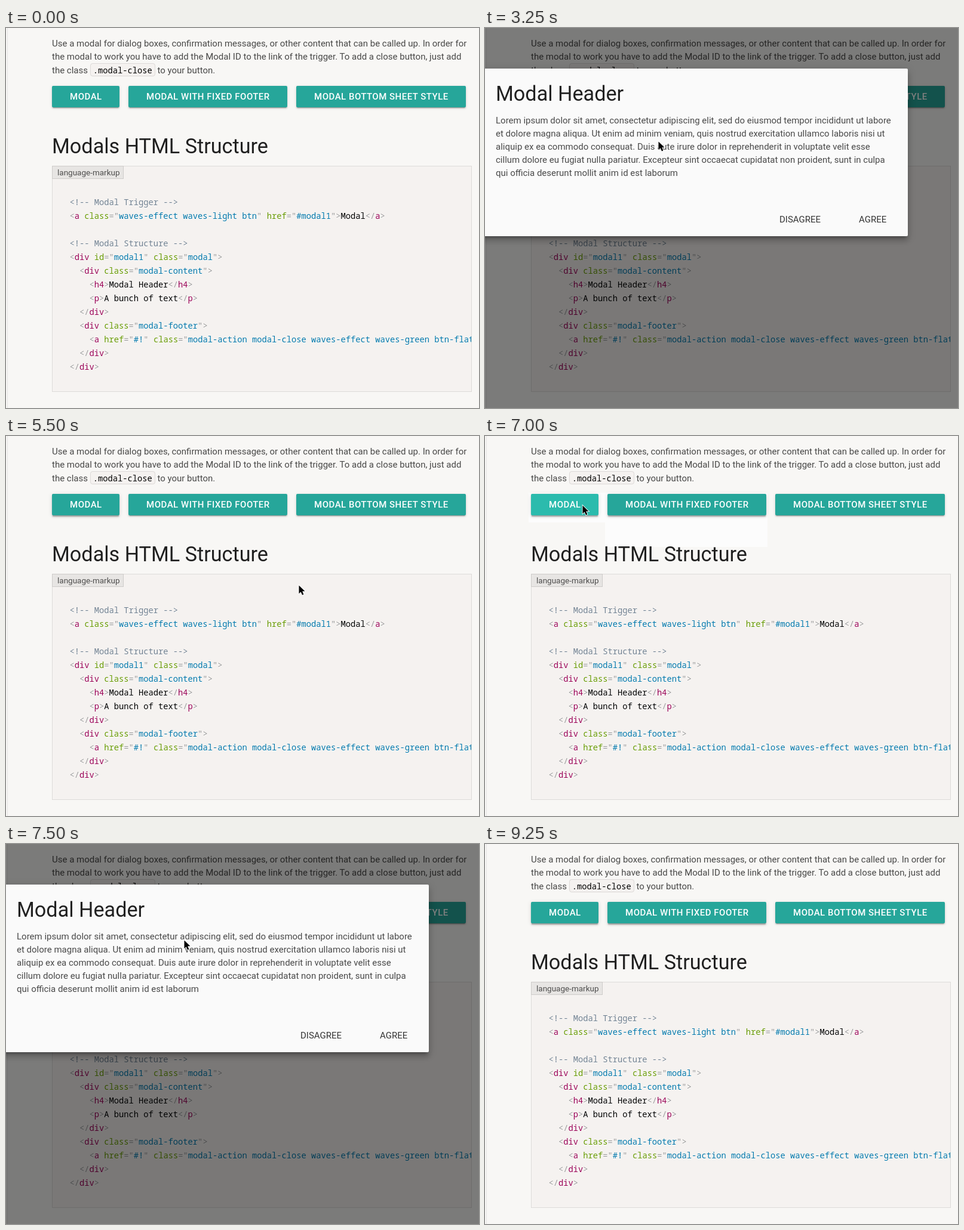
An HTML page for the animation above (10 s loop, 792 by 637 pixels).

```html
<!DOCTYPE html>
<html lang="en">
<head>
<meta charset="utf-8">
<title>Modals</title>
<style>
  html, body { margin: 0; width: 100%; height: 100%; overflow: hidden; }
  body {
    position: relative;
    background: #f8f7f5;
    font: 15px/22.5px Roboto, sans-serif;
    color: rgba(0, 0, 0, .71);
  }
  .edge, .glow, .intro, .btn, h4, pre, .label, .veil, .modal, .modal p, .flat, .wave, .cursor {
    position: absolute;
    margin: 0;
    box-sizing: border-box;
  }
  .intro, h4, .btn, .modal p, .flat, .label { white-space: pre; }

  .edge { left: 2px; top: 0; width: 1px; height: 100%; background: #e6e5e4; }
  .glow { background: #fcfcfc; opacity: 0; }
  .glow.a { left: 201px; top: 95px; width: 272px; height: 91px; }
  .glow.b { left: 73px; top: 95px; width: 128px; height: 50px; }

  .intro { left: 77px; top: 14.7px; }
  code, pre { font: 13.75px/23px "Noto Sans Mono", monospace; color: #000; }
  .intro code {
    line-height: 20px;
    padding: .5px 4px;
    border: 1px solid rgba(0, 0, 0, .1);
    border-radius: 4px;
    background: #f5f2f0;
  }

  .btn {
    top: 97px;
    height: 36px;
    line-height: 36px;
    padding-left: 30px;
    overflow: hidden;
    border-radius: 2px;
    background: #26a69a;
    color: #fff;
    font-weight: 500;
    letter-spacing: .5px;
    box-shadow: 0 2px 2px rgba(0,0,0,.14), 0 1px 5px rgba(0,0,0,.12), 0 3px 1px -2px rgba(0,0,0,.2);
  }
  .btn.one { left: 77px; width: 113px; }
  .btn.two { left: 205px; width: 266px; }
  .btn.three { left: 486px; width: 284px; }

  h4 { font-size: 34.2px; line-height: 40px; font-weight: 400; color: rgba(0, 0, 0, .87); }
  .title { left: 77px; top: 178.3px; }

  pre {
    left: 77px; top: 231px; width: 703px; height: 379px;
    padding: 48.2px 0 0 28.5px;
    overflow: hidden;
    border: 1px solid rgba(51, 51, 51, .12);
    background: #f5f2f0;
    text-shadow: 0 1px #fff;
  }
  .note { color: #708090; }
  .mark { color: #999; }
  .tag { color: #905; }
  .attr { color: #690; }
  .val { color: #07a; }
  .label {
    left: 77px; top: 231px; width: 120px; height: 22px;
    padding-left: 8px;
    border: 1px solid rgba(51, 51, 51, .14);
    background: #e7e5e3;
    font-size: 13.5px;
    line-height: 21px;
    color: rgba(0, 0, 0, .66);
  }

  .veil { inset: 0; background: #000; opacity: 0; }
  .modal {
    left: -6px; top: 68px; width: 714px; height: 281px;
    border-radius: 2px;
    background: #fafafa;
    opacity: 0;
    box-shadow: 0 8px 10px 1px rgba(0,0,0,.14), 0 3px 14px 2px rgba(0,0,0,.12), 0 5px 5px -3px rgba(0,0,0,.3);
  }
  .modal h4 { left: 24px; top: 22.3px; }
  .modal p { left: 24px; top: 76px; line-height: 22px; }
  .flat {
    top: 235px; height: 36px;
    line-height: 36px;
    padding-left: 30px;
    overflow: hidden;
    border-radius: 2px;
    color: #343434;
  }
  .no { left: 469px; width: 129px; }
  .yes { left: 602px; width: 106px; }

  .wave { left: 0; top: 0; width: 0; height: 0; border-radius: 50%; opacity: 0; }
  .wave::after {
    content: "";
    position: absolute;
    left: -54px; top: -54px; width: 108px; height: 108px;
    border-radius: 50%;
    background: inherit;
  }
  .light { background: #fff; }
  .green { background: #4caf50; }
  .cursor { left: 0; top: 0; width: 16px; height: 20px; overflow: visible; opacity: 0; }

  /* The picture moves four times a second: 2.5% is one step. */
  .glow, .btn, .veil, .modal, .yes, .wave, .cursor { animation: none 10s step-end infinite; }
  .glow.a { animation-name: glowA; }
  .glow.b { animation-name: glowB; }
  .btn.one { animation-name: hoverOne; }
  .btn.two { animation-name: hoverTwo; }
  .yes { animation-name: hoverYes; }
  .light { animation-name: light; }
  .green { animation-name: green; }
  .veil { animation-name: veil; }
  .modal { animation-name: modal; }
  .cursor { animation-name: cursor; }

  @keyframes glowA { 60% { opacity: 1; } 72.5%, 100% { opacity: 0; } }
  @keyframes glowB { 67.5% { opacity: 1; } 72.5%, 100% { opacity: 0; } }
  @keyframes hoverOne {
    25%, 67.5% {
      background: #2bbbad;
      box-shadow: 0 3px 3px rgba(0,0,0,.14), 0 1px 7px rgba(0,0,0,.12), 0 3px 1px -1px rgba(0,0,0,.2);
    }
    0%, 30%, 75%, 100% { background: #26a69a; }
  }
  @keyframes hoverTwo {
    60% {
      background: #2bbbad;
      box-shadow: 0 3px 3px rgba(0,0,0,.14), 0 1px 7px rgba(0,0,0,.12), 0 3px 1px -1px rgba(0,0,0,.2);
    }
    0%, 67.5%, 100% { background: #26a69a; }
  }
  @keyframes hoverYes {
    45%, 85% { background: #ebebeb; }
    0%, 50%, 90%, 100% { background: transparent; }
  }
  @keyframes light {
    27.5% { opacity: .24; transform: translate(51px, 20px) scale(.95); }
    72.5% { opacity: .24; transform: translate(84px, 20px) scale(1); }
    0%, 30%, 75%, 100% { opacity: 0; }
  }
  @keyframes green {
    47.5% { opacity: .2; transform: translate(71px, 24px) scale(.48); }
    87.5% { opacity: .32; transform: translate(48px, 11px); }
    0%, 50%, 90%, 100% { opacity: 0; }
  }
  @keyframes veil {
    27.5% { opacity: .018; }
    30%, 75% { opacity: .5; }
    72.5% { opacity: .25; }
    87.5% { opacity: .21; }
    0%, 50%, 90%, 100% { opacity: 0; }
  }
  @keyframes modal {
    27.5% { opacity: .05; transform: translateY(16px) scaleX(.715); }
    30%, 75% { opacity: 1; transform: none; }
    72.5% { opacity: .5; transform: translateY(8px) scaleX(.85); }
    87.5% { opacity: .44; transform: translateY(9px) scaleX(.833); }
    0%, 50%, 90%, 100% { opacity: 0; transform: translateY(17px) scaleX(.7); }
  }
  @keyframes cursor {
    0% { opacity: 0; }
    2.5% { opacity: 1; transform: translate(245px, 98px); }
    5% { opacity: 1; transform: translate(128px, 143px); }
    10% { opacity: 1; transform: translate(132px, 133px); }
    12.5% { opacity: 1; transform: translate(136px, 125px); }
    25%, 30% { opacity: 1; transform: translate(123px, 118px); }
    32.5% { opacity: 1; transform: translate(290px, 190px); }
    35% { opacity: 1; transform: translate(480px, 265px); }
    42.5% { opacity: 1; transform: translate(585px, 297px); }
    45%, 50% { opacity: 1; transform: translate(662px, 330px); }
    55% { opacity: 1; transform: translate(490px, 250px); }
    57.5% { opacity: 1; transform: translate(340px, 169px); }
    60% { opacity: 1; transform: translate(310px, 126px); }
    62.5% { opacity: 1; transform: translate(295px, 117px); }
    67.5% { opacity: 1; transform: translate(172px, 117px); }
    70%, 72.5% { opacity: 1; transform: translate(163px, 116px); }
    75% { opacity: 1; transform: translate(298px, 161px); }
    77.5% { opacity: 1; transform: translate(450px, 232px); }
    82.5% { opacity: 1; transform: translate(580px, 296px); }
    85%, 87.5% { opacity: 1; transform: translate(634px, 317px); }
    90% { opacity: 1; transform: translate(634px, 317px); }
    92.5%, 100% { opacity: 0; }
  }
</style>
</head>
<body>
<div class="edge"></div>
<div class="glow a"></div>
<div class="glow b"></div>

<p class="intro">Use a modal for dialog boxes, confirmation messages, or other content that can be called up. In order for
the modal to work you have to add the Modal ID to the link of the trigger. To add a close button, just add
the class <code>.modal-close</code> to your button.</p>

<div class="btn one">MODAL<div class="wave light"></div></div>
<div class="btn two">MODAL WITH FIXED FOOTER</div>
<div class="btn three">MODAL BOTTOM SHEET STYLE</div>

<h4 class="title">Modals HTML Structure</h4>
<pre>&lt;!-- Modal Trigger --&gt;
&lt;a class="waves-effect waves-light btn" href="#modal1"&gt;Modal&lt;/a&gt;

&lt;!-- Modal Structure --&gt;
&lt;div id="modal1" class="modal"&gt;
  &lt;div class="modal-content"&gt;
    &lt;h4&gt;Modal Header&lt;/h4&gt;
    &lt;p&gt;A bunch of text&lt;/p&gt;
  &lt;/div&gt;
  &lt;div class="modal-footer"&gt;
    &lt;a href="#!" class="modal-action modal-close waves-effect waves-green btn-flat"&gt;Agree&lt;/a&gt;
  &lt;/div&gt;
&lt;/div&gt;</pre>
<div class="label">language-markup</div>

<div class="veil"></div>
<div class="modal">
  <h4>Modal Header</h4>
  <p>Lorem ipsum dolor sit amet, consectetur adipiscing elit, sed do eiusmod tempor incididunt ut labore
et dolore magna aliqua. Ut enim ad minim veniam, quis nostrud exercitation ullamco laboris nisi ut
aliquip ex ea commodo consequat. Duis aute irure dolor in reprehenderit in voluptate velit esse
cillum dolore eu fugiat nulla pariatur. Excepteur sint occaecat cupidatat non proident, sunt in culpa
qui officia deserunt mollit anim id est laborum</p>
  <div class="flat no">DISAGREE</div>
  <div class="flat yes">AGREE<div class="wave green"></div></div>
</div>

<svg class="cursor" viewBox="0 0 16 20">
  <path d="M.5 .5V14.2L3.7 11.2L6 16.4L8.4 15.4L6.2 10.3H10.5Z" stroke="#fff" stroke-width="1.6" paint-order="stroke"/>
</svg>

<script>
  // Colour the markup sample.
  const pre = document.querySelector('pre');
  const span = (kind, text) =>
    text ? `<span class="${kind}">${text.replace(/</g, '&lt;')}</span>` : '';
  const token = /(<!--.*?-->)|(<\/?)(\w+)|(\w+)(=")([^"]*)(")|(>)/g;
  const kinds = ['note', 'mark', 'tag', 'attr', 'mark', 'val', 'mark', 'mark'];
  pre.innerHTML = pre.textContent.replace(token, (all, ...parts) =>
    kinds.map((kind, i) => span(kind, parts[i])).join(''));
</script>
</body>
</html>
```
